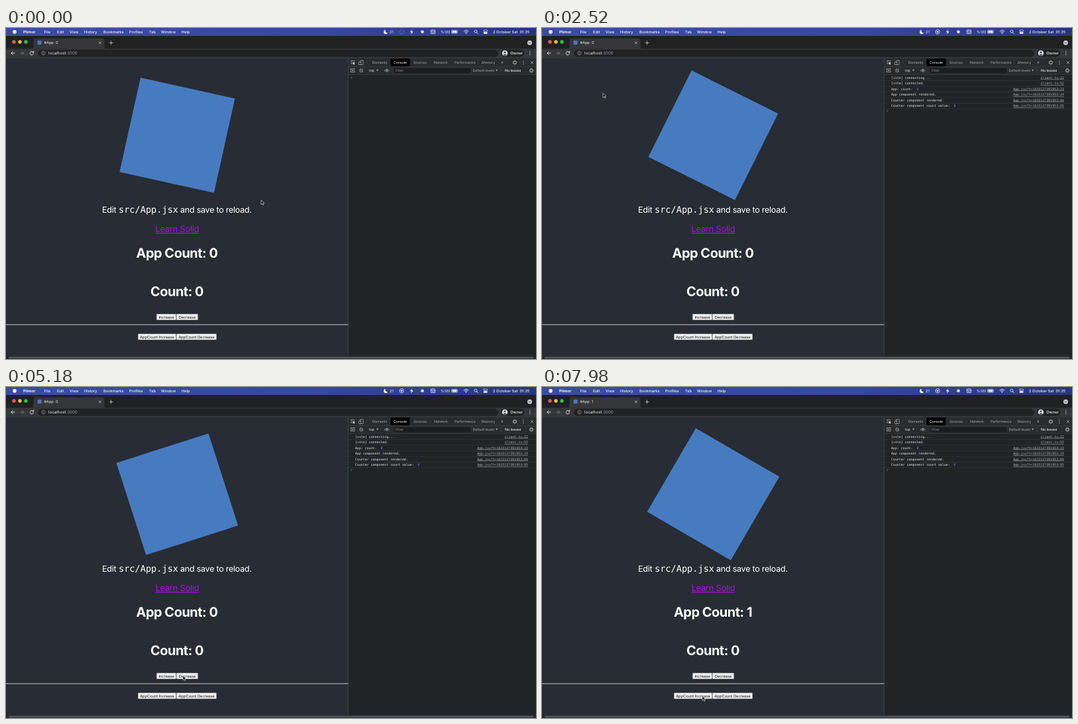
These frames come from a looping animation (800 by 500 pixels, 8 s). An HTML page:

```html
<!DOCTYPE html>
<html lang="en">
<head>
<meta charset="utf-8">
<title>Counter app</title>
<style>
  html, body { margin: 0; width: 100%; height: 100%; overflow: hidden; background: #202124; }
  svg { display: block; width: 100vw; height: 100vh; }
  text { font-family: Inter, "Open Sans", sans-serif; white-space: pre; text-rendering: geometricPrecision; }
  .mono { font-family: "DejaVu Sans Mono", monospace; }
  .link { text-decoration: underline; }
  .line { fill: none; stroke-linecap: round; stroke-linejoin: round; }
</style>
</head>
<body>
<svg id="stage" viewBox="0 0 800 500" preserveAspectRatio="none"></svg>
<script>
const LOOP = 8000, STEP = 70;
const RECORDING = 280, RELOAD = 1905, COUNTED = 7560;
const SPIN = 0.01715; // degrees per ms

const rect = (x, y, w, h, fill, more = '') =>
  `<rect x="${x}" y="${y}" width="${w}" height="${h}" fill="${fill}" ${more}/>`;
const dot = (x, y, r, fill, more = '') => `<circle cx="${x}" cy="${y}" r="${r}" fill="${fill}" ${more}/>`;
const ring = (x, y, r, stroke, width = 0.8, more = '') =>
  dot(x, y, r, 'none', `stroke="${stroke}" stroke-width="${width}" ${more}`);
const line = (d, stroke, width = 0.8) =>
  `<path class="line" d="${d}" stroke="${stroke}" stroke-width="${width}"/>`;
const shape = (d, fill) => `<path d="${d}" fill="${fill}"/>`;
const text = (x, y, size, fill, content, more = '') =>
  `<text x="${x}" y="${y}" font-size="${size}" fill="${fill}" ${more}>${content}</text>`;
const mono = (x, y, size, fill, content) => text(x, y, size, fill, content, 'class="mono"');
const centered = 'text-anchor="middle"';
const cross = (x, y, r, stroke) =>
  line(`M${x - r} ${y - r}l${2 * r} ${2 * r}m0 ${-2 * r}l${-2 * r} ${2 * r}`, stroke);
const gear = (x, y) => ring(x, y, 2.1, '#b4b8bc', 1) +
  ring(x, y, 3, '#b4b8bc', 0.8, 'stroke-dasharray="1.18 1.18"');
const kebab = (x, y) => [-2.4, 0, 2.4].map(d => dot(x, y + d, 0.65, '#c4c7ca')).join('');
const triangle = (x, y) => shape(`M${x} ${y}h3.4l-1.7 2.8z`, '#9aa0a6');

function menuBar() {
  const items = [[57.5, 'File'], [77, 'Edit'], [96, 'View'], [118, 'History'], [147, 'Bookmarks'],
    [186, 'Profiles'], [216, 'Tab'], [234, 'Window'], [265, 'Help']];
  const white = '#f2f3fa';
  return `<defs><linearGradient id="bar"><stop stop-color="#3b4ca3"/><stop offset=".6" stop-color="#3648a0"/>
    <stop offset="1" stop-color="#28347f"/></linearGradient></defs>` +
    rect(0, 0, 800, 12, 'url(#bar)') +
    dot(13, 5.8, 2.9, white) +
    text(26, 8, 5.9, white, 'Plimor', 'font-weight="700"') +
    items.map(([x, label]) => text(x, 8, 5.7, white, label, 'font-weight="500"')).join('') +
    shape('M573 2.8a3.2 3.2 0 1 0 3.2 4.5a3 3 0 0 1-3.2-4.5z', white) +
    text(579, 8, 5.7, white, '21') +
    shape('M613.5 2l-3.8 4.3h2.5l-1.2 3.5 4-4.6h-2.6z', white) +
    dot(628.5, 5.8, 2.2, white) +
    rect(641.3, 3, 6.4, 5.6, 'none', `rx=".8" stroke="${white}" stroke-width=".8"`) +
    line('M641.5 5h6m-4.5 1.8h3', white, 0.7) +
    text(656, 8, 5.5, white, '%100') +
    rect(672.5, 3.3, 9, 4.8, 'none', `rx="1.2" stroke="${white}" stroke-width=".6"`) +
    rect(673.5, 4.2, 7, 3, white, 'rx=".5"') +
    line('M691 4.7q3.5-3 7 0m-5.7 1.5q2.2-1.9 4.4 0', white, 0.9) + dot(694.5, 7.9, 0.8, white) +
    ring(709, 5.2, 2.1, white) + line('M710.7 6.9l1.8 1.8', white) +
    rect(720.7, 3, 6, 2.5, 'none', `rx="1.25" stroke="${white}" stroke-width=".7"`) +
    rect(720.7, 6.3, 6, 2.5, white, 'rx="1.25"') +
    text(735, 8, 5.7, white, '2 October Sat  01:35', 'font-weight="500"');
}

function browserFrame() {
  return rect(0, 12, 800, 20, '#1f2123') +
    ['#fc5b54', '#fdbc2e', '#2ac840'].map((c, i) => dot(12 + i * 9, 21, 2.7, c)).join('') +
    shape('M38 31.5q3.5 0 3.5-3.5v-9q0-3.5 3.5-3.5h100q3.5 0 3.5 3.5v9q0 3.5 3.5 3.5z', '#35373a') +
    cross(142, 22.4, 1.5, '#d5d7da') +
    line('M156 22.4h5m-2.5-2.5v5', '#d5d7da') +
    dot(790.5, 22.2, 3.5, '#c8cbce') + line('M789 21.7l1.5 1.4 1.5-1.4', '#202124') +
    rect(0, 31.3, 800, 14.7, '#35373a') +
    line('M13 38h-5.2m2.4-2.4l-2.4 2.4 2.4 2.4', '#dfe1e4', 0.9) +
    line('M21.5 38h5.2m-2.4-2.4l2.4 2.4-2.4 2.4', '#797c80', 0.9) +
    rect(48, 32.7, 695, 11, '#202224', 'rx="5.5"') +
    ring(56.5, 38, 2.7, '#a8abb0', 0.6) + line('M56.5 37.8v1.6m0-3v.1', '#a8abb0', 0.6) +
    text(64, 40.3, 6.2, '#edeef0', 'localhost<tspan fill="#92969b">:3000</tspan>') +
    rect(747, 32.7, 35, 11, '#202224', 'rx="5.5"') +
    dot(753, 38, 4.3, '#d5d8db') + dot(753, 36.8, 1.3, '#34373a') +
    shape('M750.5 40.8q2.5-3 5 0q-2.5 1.9-5 0z', '#34373a') +
    text(761.3, 40.2, 5.9, '#edeef0', 'Owner', 'font-weight="500"') +
    kebab(790.8, 38);
}

function button(x, y, width, label) {
  return rect(x + 0.25, y, width - 0.5, 9, '#efefef', 'rx="1" stroke="#777" stroke-width=".5"') +
    text(x + width / 2, y + 6.5, 5.7, '#111', label, centered);
}

function heading(y, content, more = '') {
  return text(258, y, 20, '#fff', content, `font-weight="700" letter-spacing="-.5" ${centered} ${more}`);
}

function page() {
  const body = (x, content) => text(x, 279, 12.6, '#fff', content, 'letter-spacing="-.28"');
  return rect(0, 46, 517, 450.5, '#282c34') +
    body(145, 'Edit') + mono(170, 279, 13.6, '#fff', 'src/App.jsx') +
    body(263, 'and save to reload.') +
    text(258.4, 308.3, 12.8, '#a316db', 'Learn Solid', `class="link" letter-spacing="-.2" ${centered}`) +
    heading(347, 'App Count: 0', 'id="appCount"') +
    heading(404.6, 'Count: 0') +
    button(227, 432, 30, 'Increase') + button(257, 432, 33, 'Decrease') +
    rect(0, 447.6, 516.5, 1, '#c9cbcd') +
    button(199, 462, 58, 'AppCount Increase') + button(257, 462, 61, 'AppCount Decrease');
}

function devtools() {
  const gray = '#a9adb2';
  const tabs = [[553, 'Elements'], [585, 'Console'], [615, 'Sources'], [646, 'Network'],
    [677, 'Performance'], [718, 'Memory']];
  return rect(517, 46, 283, 450.5, '#202426') +
    rect(517, 46, 283, 24, '#292c2e') +
    rect(580.5, 46, 29, 12, '#000') +
    rect(517, 58, 283, 0.5, '#45494c') + rect(517, 70, 283, 0.5, '#45494c') +
    rect(516.4, 46, 0.7, 450.5, '#45494c') +
    rect(521, 49.5, 4.5, 4.5, 'none', `stroke="${gray}" stroke-width=".7"`) +
    shape('M523.2 51.6l4 1.6-1.6.6 1 1.3-.8.6-1-1.4-.9 1z', '#d0d4d8') +
    rect(534.8, 49, 4.3, 6.4, 'none', `stroke="${gray}" stroke-width=".7"`) +
    rect(532.8, 51.5, 3, 4, '#292c2e', `stroke="${gray}" stroke-width=".7"`) +
    rect(544, 49, 0.5, 6.5, '#4a4e52') +
    tabs.map(([x, label]) => text(x, 54.1, 5.2, label === 'Console' ? '#fff' : gray, label)).join('') +
    text(747, 54, 6.5, gray, '»') +
    gear(768, 52.2) + kebab(781, 52.2) + cross(794, 52.2, 1.6, '#c4c7ca') +
    rect(520.7, 61.5, 5.2, 5.2, 'none', `stroke="${gray}" stroke-width=".7"`) +
    shape('M522.4 62.6l2.4 1.5-2.4 1.5z', gray) +
    ring(536.2, 64.2, 2.4, gray) + line('M534.6 62.6l3.2 3.2', gray) +
    text(548, 66, 5.3, '#dfe1e4', 'top') + triangle(559, 62.8) +
    line('M571.5 64.2q3.5-4 7 0q-3.5 4-7 0z', gray, 0.7) + dot(575, 64.2, 1.1, gray) +
    rect(585, 60, 117, 9, '#1b1e20', 'stroke="#3c4043" stroke-width=".5"') +
    text(588, 66, 5.2, '#8b9095', 'Filter') +
    text(704.5, 66, 5.1, gray, 'Default levels') + triangle(739, 62.8) +
    rect(747, 60, 0.5, 8, '#4a4e52') +
    text(753, 66, 5.2, '#edeef0', 'No Issues', 'font-weight="500"') +
    gear(793, 64.2);
}

function consoleLog() {
  const module = 'App.jsx?t=1633127391953:';
  const value = '<tspan fill="#8a7fe8">0</tspan>';
  const rows = [['[vite] connecting...', 'client.ts:22'], ['[vite] connected.', 'client.ts:52'],
    [`App: count:  ${value}`, module + 23], ['App component rendered.', module + 24],
    ['Counter component rendered.', module + 84], [`Counter component count value:  ${value}`, module + 85]];
  return rows.map(([message, origin], i) => {
    const y = 76.5 + i * 8.5;
    return mono(527, y, 4.91, '#e6e8ea', message) +
      text(788, y, 4.91, '#b3b6ba', origin, 'class="mono link" text-anchor="end"') +
      rect(517, y + 2.7, 283, 0.5, '#3a3e41');
  }).join('');
}

const stage = document.getElementById('stage');
stage.innerHTML = menuBar() + browserFrame() + page() + devtools() +
  rect(0, 496.5, 800, 3.5, '#26282e') + rect(4, 496.6, 792, 2.6, '#52545c', 'rx="1"') +
  rect(185.5, 89, 146, 146, '#477bc0', 'id="logo"') +
  rect(47.5, 19, 6, 6, '#477bc0', 'id="favicon"') +
  text(57.5, 24.4, 5.6, '#e8eaed', '#App: 0', 'id="tabTitle"') +
  ring(597.2, 5.8, 3.2, '#f2f3fa', 0.8, 'id="recordRing"') + dot(597.2, 5.8, 1.4, '#f2f3fa', 'id="recordDot"') +
  dot(39, 38, 6, '#4c4f53', 'id="hover"') +
  line('M41 36.3a2.7 2.7 0 1 0 .6 2.2m.1-3.5v2.1h-2.1', '#dfe1e4', 0.9) +
  `<g id="log">${consoleLog()}</g>` +
  `<g id="prompt">${line('M520.8 -1.2l1.5 1.2-1.5 1.2', '#4c83d9', 0.7)}</g>` +
  `<path id="pointer" d="M0 0v6.6l1.6-1.4 1.1 2.5 1.2-.5-1.1-2.5h2.2z" fill="#111" stroke="#eee" stroke-width=".6"/>`;

const part = id => document.getElementById(id);
const show = (id, on) => part(id).setAttribute('visibility', on ? 'visible' : 'hidden');
const move = (id, value) => part(id).setAttribute('transform', value);

// Pointer stops: time, x, y
const stops = [[0, 385, 260], [300, 385, 260], [1400, 38, 37], [2200, 38, 37], [3200, 261, 291],
  [3400, 261, 291], [4200, 246, 437], [4500, 246, 437], [5040, 267, 436], [5500, 267, 436],
  [6300, 228, 466], [6650, 228, 466], [7400, 242, 467], [LOOP, 242, 467]];

function pointerAt(t) {
  const i = stops.findIndex(stop => stop[0] > t);
  const [t0, x0, y0] = stops[i - 1], [t1, x1, y1] = stops[i];
  const p = (t - t0) / (t1 - t0), eased = p * p * (3 - 2 * p);
  return [x0 + (x1 - x0) * eased, y0 + (y1 - y0) * eased];
}

function draw(t) {
  const loaded = t >= RELOAD, count = t >= COUNTED ? 1 : 0;
  const turn = loaded ? SPIN * (t - RELOAD) : 86.5 + SPIN * t;
  const [x, y] = pointerAt(t);
  move('logo', `rotate(${turn + 16} 258.5 162)`);
  move('pointer', `translate(${x} ${y})`);
  move('prompt', `translate(0 ${loaded ? 125.5 : 75})`);
  show('log', loaded);
  show('favicon', t < 1820 || t >= 2100);
  show('hover', Math.hypot(x - 39, y - 38) < 6);
  show('recordDot', t >= RECORDING);
  part('recordRing').setAttribute('stroke-dasharray', t < RECORDING ? '.7 1.81' : 'none');
  part('appCount').textContent = `App Count: ${count}`;
  part('tabTitle').textContent = `#App: ${count}`;
}

const start = performance.now();
function tick() {
  const t = (performance.now() - start) % LOOP;
  draw(Math.floor(t / STEP) * STEP);
  requestAnimationFrame(tick);
}
tick();
</script>
</body>
</html>
```
